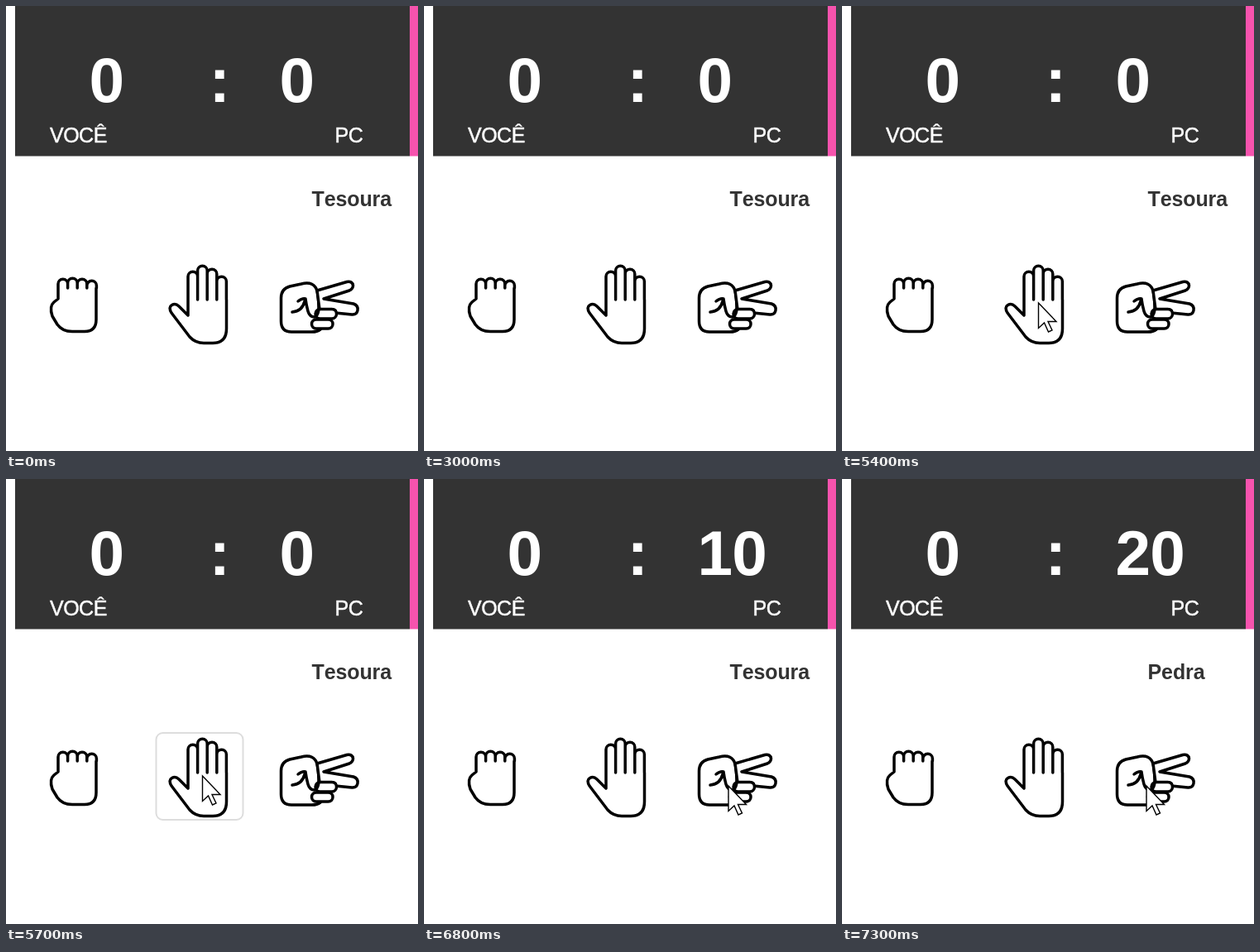
Animation, 498 px wide and 538 px high, one loop 8000 ms. Source, as an HTML page:

```html
<!DOCTYPE html>
<html lang="pt">
<head>
<meta charset="utf-8">
<title>Jokenpô</title>
<style>
  html, body { margin: 0; width: 100%; height: 100%; overflow: hidden; background: #fff; }
  svg { display: block; width: 498px; height: 538px; }
  text { font: 25px "Liberation Sans", Arial, sans-serif; font-kerning: none; fill: #fff; }
  .label { letter-spacing: -.5px; stroke: #fff; stroke-width: .5; }
  .score { font-size: 76.5px; font-weight: bold; letter-spacing: -.8px; }
  #choice { font-weight: bold; fill: #333; letter-spacing: -.1px; }
  .icon { fill: #fff; stroke: #000; stroke-width: 3.5; stroke-linecap: round; stroke-linejoin: round; }
  .line { fill: none; }
</style>
</head>
<body>
<svg viewBox="0 0 498 538">
  <path fill="#333" d="M11 0H488V181.5H11Z"/>
  <path fill="#f653ae" d="M488 0H498V181.5H488Z"/>
  <text class="score" x="100.500" y="115.500">0</text>
  <text class="score" x="245.500" y="115.500">:</text>
  <text class="score" x="330.500" y="115.500" id="pc">0</text>
  <text class="label" x="53" y="165">VOCÊ</text>
  <text class="label" x="397.500" y="165">PC</text>
  <text x="369.500" y="241.500" id="choice">Tesoura</text>

  <rect id="press" y="307" width="105" height="105" rx="8" fill="none" stroke="#ddd" stroke-width="2"/>

  <g class="icon line">
    <path id="rock" d="M109 341V379Q109 393.500 95 393.500H80Q68 393.500 62 385L56 375Q52 363 58 358L63 354V341"/>
    <path id="paper" d="M266.500 355V390Q266.500 407.500 250 407.500H239Q229 407.500 222 400L200 371
      Q196 364 200.500 361.500Q205 359 209 363L220 374V355"/>
  </g>
  <g class="icon">
    <path d="M380 391Q376 394 370 394H345Q332.500 394 332.500 381V353Q332.500 342 343 339L357 336
      Q369 333 374 340Q378 346 378 367"/>
    <path d="M376 344L412 333.500Q419 332.500 419.500 338Q419.500 342 415 344L384 354L420 360
      Q426 362 425 368Q424 373.500 418 373L398 371Q400 368 396 367H379Z"/>
    <rect x="374" y="366.500" width="25.500" height="11.500" rx="5.700"/>
    <rect x="369.500" y="379" width="25.500" height="11" rx="5.500"/>
    <path class="line" d="M346 370Q358 369 361 357M353 357Q358 353 362 354Q363 362 365 369Q367 376 373 376Q377 375 378 367"/>
  </g>

  <path id="cursor" fill="#fff" stroke="#000" stroke-width="1.400" d="M.5 1V31.500L7.500 25L12.500 36L17 34L12 23.500H22Z"/>
</svg>
<script>
const LOOP = 8000, STEP = 100;
const $ = id => document.getElementById(id);

// Four round-topped fingers side by side.
function addFingers(id, x, bottom, tops) {
  const d = tops.map((y, i) => `M${x + i * 11.6} ${bottom}V${y}a5.8 5.8 0 0 1 11.6 0V${bottom}`);
  const path = $(id);
  path.setAttribute("d", path.getAttribute("d") + d.join(""));
}
addFingers("rock", 63, 341, [336, 335, 336, 338]);
addFingers("paper", 220, 355, [327, 320, 324, 333]);

const spots = { pc: [407, 103], choice: [440, 150], you: [86, 115], paper: [237, 358], scissors: [367.5, 370] };

const moves = [
  { start: 200, end: 900, from: spots.pc, to: spots.choice },
  { start: 1600, end: 2200, from: spots.choice, to: spots.you },
  { start: 4800, end: 5400, from: [97, 487], to: spots.paper },
  { start: 6400, end: 6800, from: spots.paper, to: spots.scissors }
];

const rounds = [
  { down: 5700, up: 5900, x: 181.5, pc: 10, choice: "Tesoura" },
  { down: 7100, up: 7300, x: 325, pc: 20, choice: "Pedra" }
];

const ease = f => f * f * (3 - 2 * f);
const show = (el, on) => { el.style.display = on ? "" : "none"; };

function cursorAt(t) {
  const { start, end, from, to } = moves.findLast(m => t >= m.start) || moves[0];
  const f = ease(Math.min(1, Math.max(0, (t - start) / (end - start))));
  return from.map((a, i) => a + (to[i] - a) * f);
}

function draw(now) {
  const t = Math.floor((now % LOOP) / STEP) * STEP;

  const last = rounds.findLast(r => t >= r.up) || { pc: 0, choice: "Tesoura" };
  $("pc").textContent = last.pc;
  $("choice").textContent = last.choice;

  const pressed = rounds.find(r => t >= r.down && t < r.up);
  show($("press"), pressed);
  if (pressed) $("press").setAttribute("x", pressed.x);

  show($("cursor"), t >= 4800 || (t >= 100 && t < 3000));
  $("cursor").setAttribute("transform", `translate(${cursorAt(t)})`);
}

const begin = performance.now();
function tick() {
  draw(performance.now() - begin);
  requestAnimationFrame(tick);
}
tick();
</script>
</body>
</html>
```
